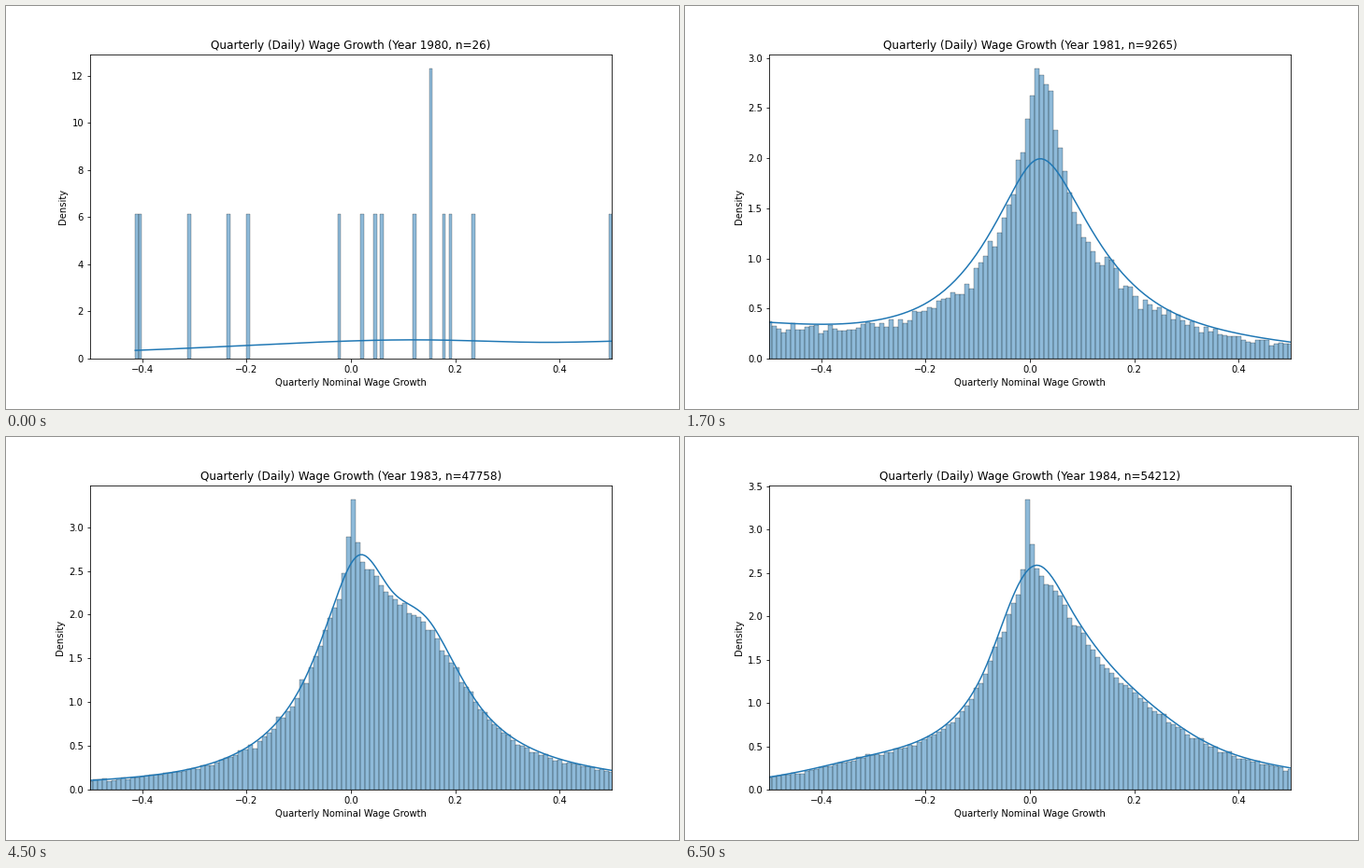
Animation of 720 by 432 pixels, one loop 8000 ms. Source, as a matplotlib script:

```python
import matplotlib.pyplot as plt
import numpy as np
from matplotlib.animation import FuncAnimation

BLUE = "#1f77b4"
EDGE_WIDTH = 0.24

# First year: a handful of observations, given as the bins they fall in
SPARSE_N, SPARSE_START, SPARSE_BIN = 26, -0.4134, 0.00626
SPARSE_BINS = [0, 1, 16, 28, 34, 62, 69, 73, 75, 85, 90, 90, 94, 96, 103, 145]
SPARSE_KNOTS = [SPARSE_START, -.2, 0, .1, .2, .37, .5]
SPARSE_CURVE = [.35, .56, .75, .795, .775, .69, .74]

# Later years: density at a few key points, and a narrow spike on top of it
BIN = 0.009
KNOTS = [-.5, -.35, -.2, -.1, -.04, .015, .08, .15, .25, .4, .5]
YEARS = {
    1981: dict(n=9265, peak=2.89, mode=1, share=.88, spike=(.53, .022, .042),
               curve=[.362, .35, .55, 1.06, 1.60, 1.99, 1.63, 1.03, .53, .25, .165]),
    1982: dict(n=33575, peak=3.75, mode=-1, share=.96, spike=(.18, .012, .03),
               curve=[.105, .20, .49, 1.22, 2.33, 3.25, 2.36, 1.45, .78, .29, .18]),
    1983: dict(n=47758, peak=3.312, mode=0, share=.97, spike=(.2, .002, .012),
               curve=[.105, .19, .48, 1.13, 1.99, 2.68, 2.26, 1.93, .93, .35, .22]),
    1984: dict(n=54212, peak=3.345, mode=-1, share=.96, spike=(.25, -.003, .01),
               curve=[.145, .335, .60, 1.22, 2.12, 2.59, 2.07, 1.47, .90, .39, .25]),
}


def density(x, knots, values):
    """Natural cubic spline through the logarithms of the key points."""
    k, v = np.array(knots), np.log(values)
    h, n = np.diff(k), len(k)
    a, b = np.eye(n), np.zeros(n)
    for i in range(1, n - 1):
        a[i, i - 1:i + 2] = h[i - 1], 2 * (h[i - 1] + h[i]), h[i]
        b[i] = 6 * ((v[i + 1] - v[i]) / h[i] - (v[i] - v[i - 1]) / h[i - 1])
    m = np.linalg.solve(a, b)
    x = np.clip(x, k[0], k[-1])
    j = np.clip(np.searchsorted(k, x) - 1, 0, n - 2)
    lo, hi, w = x - k[j], k[j + 1] - x, h[j]
    return np.exp((m[j] * hi**3 + m[j + 1] * lo**3) / (6 * w)
                  + (v[j] / w - m[j] * w / 6) * hi
                  + (v[j + 1] / w - m[j + 1] * w / 6) * lo)


def sparse_bars():
    bins, counts = np.unique(SPARSE_BINS, return_counts=True)
    heights = counts / (SPARSE_N * SPARSE_BIN)
    return SPARSE_START + bins * SPARSE_BIN, heights, SPARSE_BIN


def dense_bars(year):
    """Spiked density with scatter that follows the number of samples per bin."""
    p = YEARS[year]
    bins = np.arange(-56, 56)
    x = (bins + .5) * BIN
    amount, centre, width = p["spike"]
    spike = amount * np.exp(-((x - centre) / width) ** 2)
    heights = density(x, KNOTS, p["curve"]) * (p["share"] + spike)
    noise = np.random.default_rng(year).normal(size=len(bins))
    heights += .5 * noise * np.sqrt(heights / (p["n"] * BIN))
    heights = np.minimum(heights, .985 * p["peak"])
    heights[bins == p["mode"]] = p["peak"]
    return bins * BIN, heights, BIN


def draw_year(year):
    if year in YEARS:
        left, heights, width = dense_bars(year)
        n, knots, values = YEARS[year]["n"], KNOTS, YEARS[year]["curve"]
    else:
        left, heights, width = sparse_bars()
        n, knots, values = SPARSE_N, SPARSE_KNOTS, SPARSE_CURVE
    ax.clear()
    ax.bar(left, heights, width, align="edge", facecolor=(BLUE, .5),
           edgecolor="k", linewidth=EDGE_WIDTH)
    x = np.linspace(knots[0], .5, 200)
    ax.plot(x, density(x, knots, values), color=BLUE, lw=1.5)
    ax.set(xlim=(-.5, .5), ylim=(0, 1.05 * heights.max()),
           xlabel="Quarterly Nominal Wage Growth", ylabel="Density",
           title=f"Quarterly (Daily) Wage Growth (Year {year}, n={n})")


def update(frame):
    draw_year(1980 + (frame + 3) // 4)
    return []


fig, ax = plt.subplots(figsize=(10, 6), dpi=72)
fig.subplots_adjust(left=.125, right=.9, bottom=.125, top=.88)
anim = FuncAnimation(fig, update, frames=16, interval=500, repeat=True,
                     repeat_delay=0, init_func=lambda: update(0))
plt.show()
```
